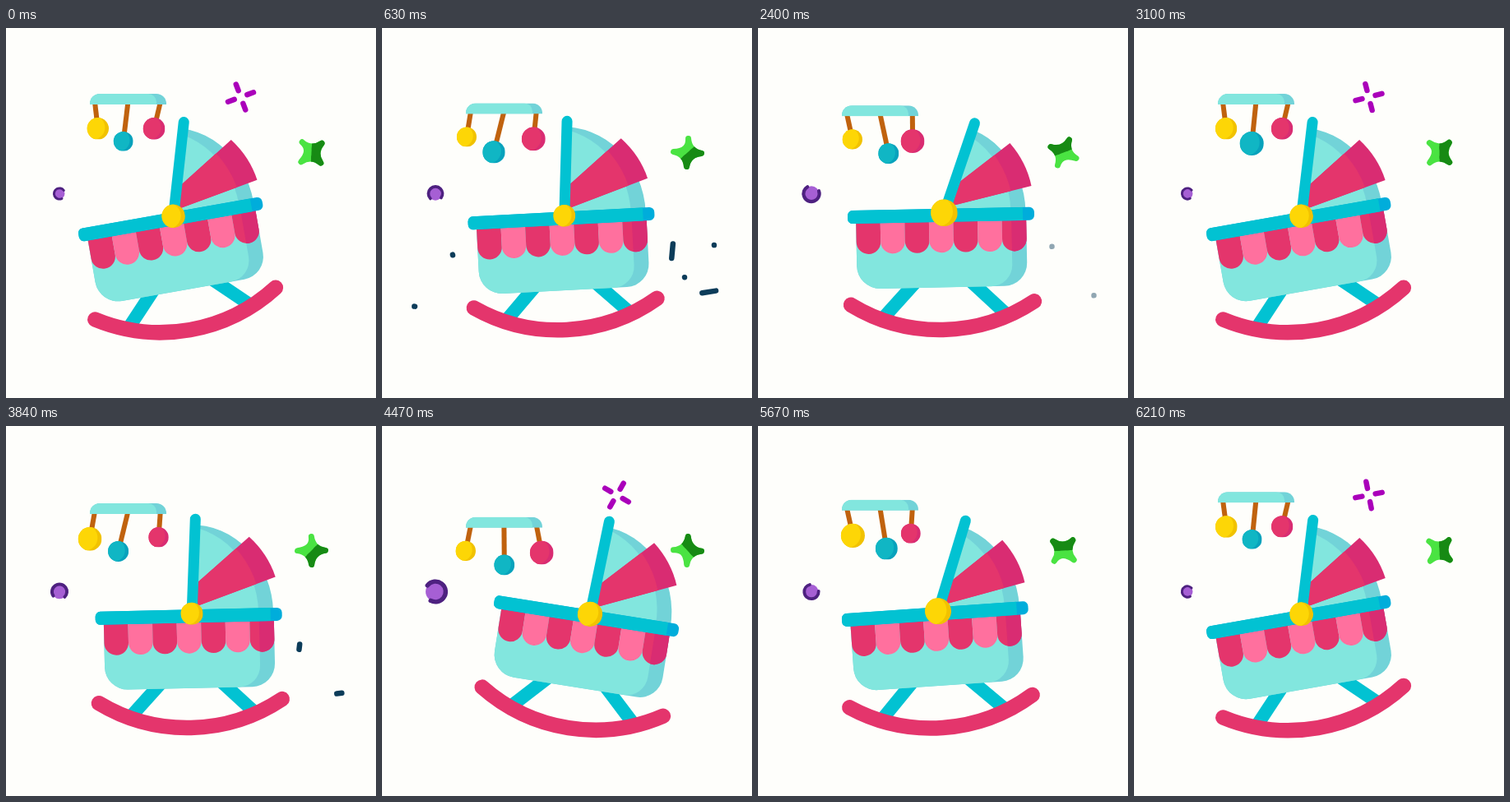
An HTML page with a canvas that plays this animation: 450 by 450 pixels, repeating every 6250 ms.

```html
<!DOCTYPE html>
<html lang="en">
<head>
<meta charset="utf-8">
<title>Rocking cradle</title>
<style>
  html, body { margin: 0; width: 100%; height: 100%; overflow: hidden; background: #fefefb; }
  canvas { display: block; width: 450px; height: 450px; }
</style>
</head>
<body>
<canvas id="stage"></canvas>
<script>
const canvas = document.getElementById('stage');
const ctx = canvas.getContext('2d');
const dpr = window.devicePixelRatio || 1;
canvas.width = canvas.height = 450 * dpr;

const LOOP = 6.25, SWING = LOOP / 2, PULSE = LOOP / 3, BURST = LOOP / 4;
const RAD = Math.PI / 180;
const C = {
  bg: '#fefefb', mint: '#82e6de', mintDark: '#72d3d8', teal: '#02c2d2', tealDark: '#00addb',
  red: '#e4356c', redDark: '#d92c72', pink: '#ff709e', yellow: '#fdd606', yellowDark: '#f1c200',
  aqua: '#10b6c4', aquaDark: '#08a2bc', wood: '#c0620e', navy: '#0c3c59', magenta: '#aa00ba',
  leaf: '#4ae342', leafDark: '#178a14', plum: '#4e2180', lilac: '#a65fd4'
};

// Sine wave of the given period that peaks at time `peak`
const wave = (t, period, peak) => Math.cos(2 * Math.PI * (t - peak) / period);
const clamp = v => Math.min(1, Math.max(0, v));
const ease = v => { v = clamp(v); return v * v * (3 - 2 * v); };
const mix = (a, b, k) => a + (b - a) * k;

function scoped(draw) {
  ctx.save();
  draw();
  ctx.restore();
}

function fill(color, path) {
  ctx.fillStyle = color;
  ctx.beginPath();
  path();
  ctx.fill();
}

function clip(path) {
  ctx.beginPath();
  path();
  ctx.clip();
}

function line(color, width, x1, y1, x2, y2, cap = 'round') {
  ctx.strokeStyle = color;
  ctx.lineWidth = width;
  ctx.lineCap = cap;
  ctx.beginPath();
  ctx.moveTo(x1, y1);
  ctx.lineTo(x2, y2);
  ctx.stroke();
}

function arc(color, width, x, y, r, from, to) {
  ctx.strokeStyle = color;
  ctx.lineWidth = width;
  ctx.lineCap = 'round';
  ctx.beginPath();
  ctx.arc(x, y, r, from * RAD, to * RAD);
  ctx.stroke();
}

function ball(x, y, r, color, shade) {
  scoped(() => {
    clip(() => ctx.arc(x, y, r, 0, 7));
    fill(shade, () => ctx.rect(x - r, y - r, 2 * r, 2 * r));
    fill(color, () => ctx.arc(x - r * .45, y - r * .1, r * 1.1, 0, 7));
  });
}

// Mobile with three swinging balls
function mobile(t) {
  const top = 96.2 - 16.1 * wave(t, SWING, 0);
  const toys = [
    [108, 7.5, 2.61, 29, 1.55, C.yellow, C.yellowDark],
    [148.4, 12.5, 2.11, 45.8, PULSE / 2, C.aqua, C.aquaDark],
    [187.8, 7.8, 1.64, 29, .5, C.red, C.redDark]
  ];
  for (const [x, sway, swayPeak, drop, pulsePeak, color, shade] of toys) {
    const r = 13.25 + 1.3 * wave(t, PULSE, pulsePeak);
    const bx = x + sway * wave(t, SWING, swayPeak);
    const by = top + drop + r;
    line(C.wood, 6, x, top + 10, bx, by, 'butt');
    ball(bx, by, r, color, shade);
  }
  scoped(() => {
    clip(() => ctx.roundRect(102, top, 93, 13, [12, 12, 0, 0]));
    fill(C.mintDark, () => ctx.rect(102, top, 93, 13));
    fill(C.mint, () => ctx.roundRect(90, top, 93, 13, [0, 10, 0, 0]));
  });
}

function canopy(x, y, pole, wedge) {
  const at = (deg, r) => [r * Math.sin(deg * RAD), -r * Math.cos(deg * RAD)];
  const dir = deg => (deg - 90) * RAD;
  ctx.translate(x, y);
  scoped(() => {
    clip(() => {
      ctx.moveTo(0, 0);
      ctx.arc(0, 0, 130, dir(pole), dir(90));
    });
    fill(C.mintDark, () => ctx.ellipse(0, 0, 99, 108, 0, 0, 7));
    fill(C.mint, () => ctx.ellipse(-18, 0, 99, 108, 0, 0, 7));
  });
  scoped(() => {
    clip(() => {
      ctx.moveTo(...at(pole, 7));
      ctx.lineTo(...at(pole, 33));
      ctx.lineTo(...at(wedge, 116.5));
      ctx.quadraticCurveTo(...at(wedge + 15, 117.5), ...at(wedge + 29.5, 111));
      ctx.closePath();
    });
    fill(C.redDark, () => ctx.rect(-130, -130, 260, 260));
    fill(C.red, () => ctx.ellipse(-18, 0, 102, 112, 0, 0, 7));
  });
  line(C.teal, 13, 0, 0, ...at(pole, 115));
}

function basket() {
  const shape = (w, r) => ctx.roundRect(122, 230, w, 87, [0, 0, r, 28]);
  fill(C.mintDark, () => shape(207, 28));
  fill(C.mint, () => shape(189, 26));
  const w = 207 / 7;
  for (let i = 0; i < 7; i++) {
    const flap = () => ctx.roundRect(122 + i * w, 230, w, 44.8, [0, 0, w / 2, w / 2]);
    fill(i % 2 ? C.pink : C.red, flap);
    if (i === 6) scoped(() => {
      clip(flap);
      fill(C.redDark, () => ctx.rect(311, 230, 20, 50));
    });
  }
}

// One streak: the tail follows the head along the path, then fades
function streak(p, [x1, y1, x2, y2], head, tail, fadeAt) {
  const h = ease((p - head[0]) / head[1]);
  const k = ease((p - tail[0]) / tail[1]);
  const alpha = 1 - clamp((p - fadeAt) / .07);
  if (h < .01 || alpha <= 0) return;
  ctx.globalAlpha = alpha;
  line(C.navy, 6.5, mix(x1, x2, k), mix(y1, y2, k), mix(x1, x2, h), mix(y1, y2, h));
  ctx.globalAlpha = 1;
}

function burst(p) {
  const long = [[.145, .52], [.3, .52], .8];
  const short = [[.16, .33], [.18, .45], .64];
  streak(p, [351, 329, 359.7, 268.5], ...long);
  streak(p, [351, 335, 409.5, 329], ...long);
  streak(p, [358, 324, 371.6, 310.7], ...short);
  streak(p, [379, 302, 409.5, 273.5], ...short);
}

function cradle(t) {
  const tilt = -10 * wave(t, SWING, 0);
  const lag = wave(t, SWING, 2.09);
  const pole = 11 + 9.6 * lag - tilt;
  const wedge = 40.4 + 4.7 * wave(t, SWING, 1.95) - tilt;
  ctx.translate(225, 376);
  ctx.rotate(tilt * RAD);
  ctx.translate(-225, -376);

  line(C.teal, 16, 202, 299, 154, 350);
  line(C.teal, 16, 251, 300, 303, 350);
  scoped(() => {
    ctx.translate(0, -2 * lag);
    scoped(() => canopy(229.5, 226.4, pole, wedge));
    basket();
    fill(C.tealDark, () => ctx.roundRect(112, 221.5, 227, 16, 6));
    fill(C.teal, () => ctx.roundRect(112, 221.5, 213, 16, [6, 0, 0, 6]));
    ball(229.5, 226.4, 15 + 1.6 * lag, C.yellow, C.yellowDark);
  });
  arc(C.red, 18.5, 225.3, 159, 208, 57.6, 122.4);

  const p = t % BURST;
  burst(p);
  ctx.translate(451, 0);
  ctx.scale(-1, 1);
  burst((p + .155) % BURST);
}

function cross(t) {
  const p = t % BURST;
  const out = 1 - clamp((p - .28) / .2);
  const back = clamp((p - 1) / .2);
  ctx.globalAlpha = Math.max(out, back);
  ctx.translate(285.5, 84);
  ctx.rotate((-20 - 360 * p / BURST) * RAD);
  for (let i = 0; i < 4; i++) {
    line(C.magenta, 6.5, 0, -8.3, 0, -16.5);
    ctx.rotate(Math.PI / 2);
  }
}

function star(t) {
  const paint = color => {
    ctx.strokeStyle = color;
    fill(color, () => {
      ctx.moveTo(0, -17);
      for (const [x, y] of [[17, 0], [0, 17], [-17, 0], [0, -17]])
        ctx.quadraticCurveTo(x ? Math.sign(x) * 2 : -Math.sign(y) * -2 * Math.sign(y), y ? Math.sign(y) * 2 : -Math.sign(x) * 2, x, y);
      ctx.closePath();
    });
    ctx.stroke();
  };
  ctx.translate(371.5, 151.5);
  ctx.rotate((-83 + 88 * wave(t, SWING, .54)) * RAD);
  ctx.lineWidth = 7;
  ctx.lineJoin = 'round';
  paint(C.leaf);
  clip(() => {
    ctx.moveTo(30, -30);
    ctx.lineTo(30, 30);
    ctx.lineTo(-30, 30);
  });
  paint(C.leafDark);
}

function ring(t) {
  const r = 11.7 - 3.7 * wave(t, SWING, .04);
  const gap = 103 + 360 * t / SWING - 90;
  fill(C.lilac, () => ctx.arc(65, 201.5, r * .8, 0, 7));
  arc(C.plum, r * .36, 65, 201.5, r * .83, gap + 50, gap + 310);
}

function draw(now) {
  const t = now / 1000 % LOOP;
  ctx.setTransform(dpr, 0, 0, dpr, 0, 0);
  ctx.fillStyle = C.bg;
  ctx.fillRect(0, 0, 450, 450);
  for (const part of [mobile, cradle, cross, star, ring]) scoped(() => part(t));
}

const start = performance.now();
function tick() {
  draw(performance.now() - start);
  requestAnimationFrame(tick);
}
tick();
</script>
</body>
</html>
```
